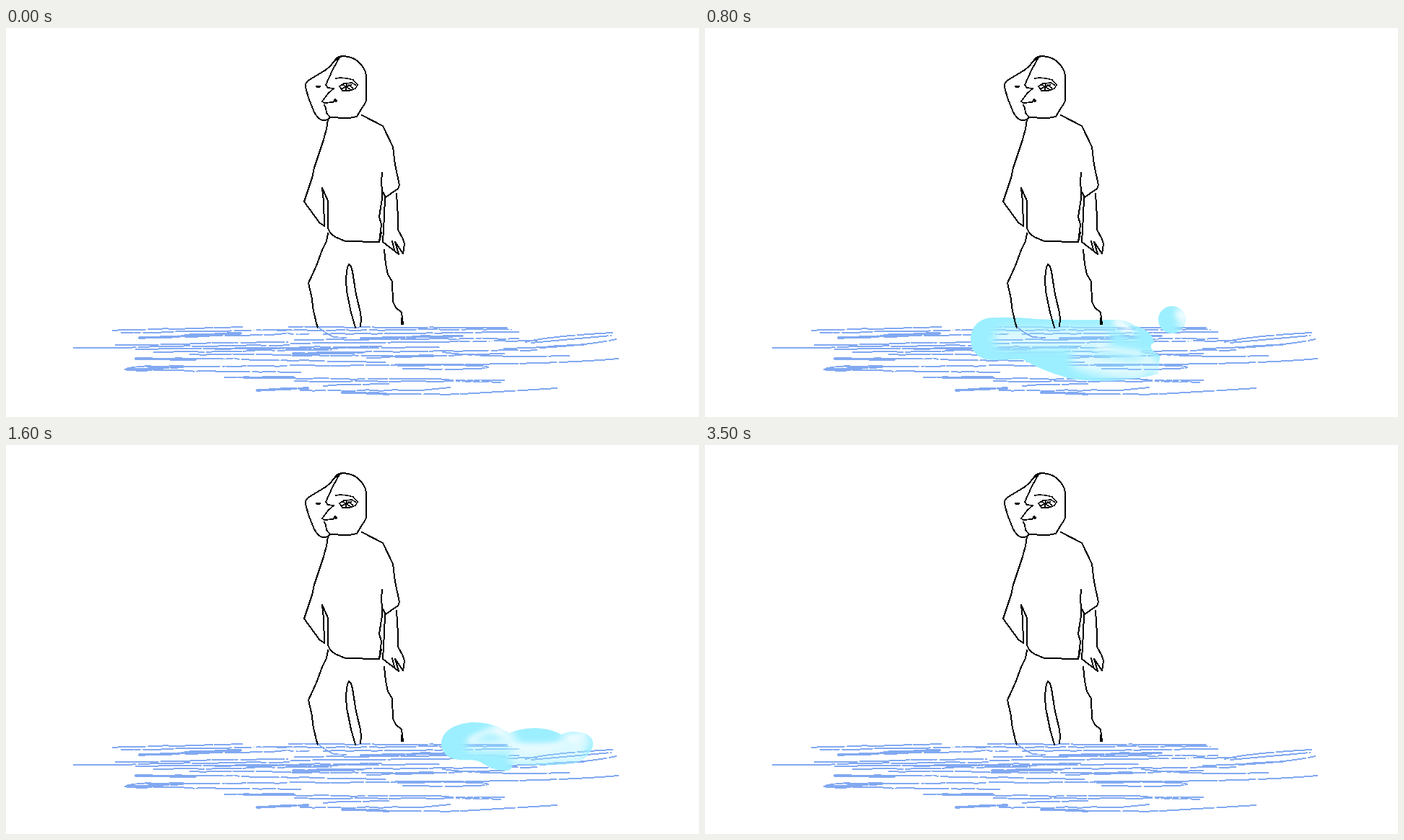
An HTML page that plays this animation: 960 px wide and 540 px high, repeating every 4500 ms.

```html
<!DOCTYPE html>
<html lang="en">
<head>
<meta charset="utf-8">
<title>Wading</title>
<style>
  html, body { margin: 0; width: 100%; height: 100%; overflow: hidden; background: #fff; }
  svg { display: block; width: 100vw; height: 100vh; }
  .ink, .water { fill: none; stroke-linecap: round; stroke-linejoin: round; shape-rendering: crispEdges; }
  .ink { stroke: #000; stroke-width: 2; }
  .water { stroke: #82a9f1; stroke-width: 2; }
</style>
</head>
<body>
<svg id="stage" viewBox="0 0 960 540"></svg>
<script>
const LOOP = 4500, WAVES_END = 2100;
const FOAM = '#9cefff';
const full = 'x="0" y="0" width="960" height="540"';

let seed = 11;
const rnd = () => (seed = (seed * 16807) % 2147483647) / 2147483647;

// Long thin water strokes: x1, y1, x2, y2
const thin = [
  [148, 420, 330, 415], [160, 423, 390, 419], [190, 430, 420, 424], [94, 444, 392, 440],
  [152, 440, 390, 436], [392, 415, 698, 416], [376, 420, 700, 418], [440, 425, 710, 422],
  [400, 433, 710, 431], [395, 438, 735, 434], [180, 446, 520, 442], [290, 446, 600, 443],
  [255, 453, 535, 455], [205, 450, 450, 447], [470, 450, 735, 447], [500, 458, 690, 452],
  [235, 458, 525, 464], [195, 470, 540, 468], [170, 475, 408, 478], [303, 485, 690, 489],
  [400, 490, 685, 491], [440, 497, 530, 493], [408, 503, 575, 503], [500, 508, 632, 508],
  [690, 445, 800, 440]
];

// Short heavy ones
const thick = [
  [185, 430, 325, 424], [492, 431, 632, 427], [398, 452, 494, 450], [540, 456, 592, 455],
  [180, 459, 262, 461], [168, 474, 245, 471], [330, 485, 398, 485], [348, 503, 418, 500],
  [466, 506, 530, 508]
];

// Bent ones
const bent = [
  'M605 450Q660 458 780 455', 'M540 467Q750 468 848 459', 'M543 469Q668 467 668 471Q660 475 550 473',
  'M200 469Q165 471 165 474', 'M632 508Q700 504 763 500', 'M575 503L615 499',
  'M720 436Q750 428 840 423', 'M740 444Q810 440 845 432', 'M728 437L838 427'
];

const water = (d, w = 2) => {
  const run = () => Math.round(25 + rnd() * 90);
  return `<path class="water" style="stroke-width:${w}" stroke-dasharray="${run()} 4 ${run()} 3 ${run()} 5" d="${d}"/>`;
};

// Slightly uneven line between two points
function rough([x1, y1, x2, y2]) {
  const n = Math.max(2, Math.round((x2 - x1) / 18));
  let d = `M${x1} ${y1}`;
  for (let k = 1; k <= n; k++) {
    const u = k / n;
    d += `L${(x1 + (x2 - x1) * u).toFixed(1)} ${(y1 + (y2 - y1) * u + rnd() * 1.6 - .8).toFixed(1)}`;
  }
  return d;
}

function speckles(x, y, w, h, n) {
  let s = '';
  while (n--) s += `<rect x="${Math.round(x + rnd() * w)}" y="${Math.round(y + rnd() * h)}" width="3" height="2" fill="#fff"/>`;
  return s;
}

const blur = (id, r) =>
  `<filter id="${id}" filterUnits="userSpaceOnUse" ${full}><feGaussianBlur stdDeviation="${r}"/></filter>`;
const brush = (color, w, o, d) =>
  `<path d="${d}" fill="none" stroke="${color}" stroke-width="${w}" stroke-opacity="${o}" stroke-linecap="round"/>`;

// A foam shape: outline, see-through strokes and white strokes
function foam(id, outline, wide, narrow, white) {
  return `<clipPath id="${id}-clip"><path d="${outline}"/></clipPath>
    <mask id="${id}-mask" maskUnits="userSpaceOnUse" ${full}>
      <rect ${full} fill="#fff"/>
      <g filter="url(#soft)">${brush('#000', 28, .66, wide)}${brush('#000', 15, .72, narrow)}</g>
    </mask>
    <g id="${id}"><g clip-path="url(#${id}-clip)">
      <rect ${full} fill="${FOAM}" mask="url(#${id}-mask)"/>
      <g filter="url(#mist)">${brush('#fff', 9, .6, white)}</g>
    </g></g>`;
}

const roll = foam('roll',
  'M332 391C308 392 295 406 296 424C297 443 307 453 324 453L420 456Q470 446 498 453Q514 462 530 462Q550 454 553 441Q553 425 540 420Q515 411 490 412Q472 404 462 394Q440 401 420 400Q370 391 332 391Z',
  'M345 420Q385 424 425 426M485 432L548 436',
  'M400 446L425 440M440 403L468 402M545 415L556 462',
  'M345 413Q390 407 426 415M408 448L422 444M450 405L468 412');

const sweep = foam('sweep',
  'M400 402C380 402 368 415 368 432C368 452 382 461 400 461L440 460Q470 477 500 485Q515 490 560 490Q600 488 628 480L630 455Q610 442 622 437Q620 420 595 413Q580 404 570 405Q500 406 460 404Q430 401 400 402ZM647 386A19 19 0 1 1 646.9 386Z',
  'M415 431L550 430M520 460Q560 474 600 474',
  'M572 409L590 425M612 458L632 480M661 392L664 414',
  'M571 407L586 418M545 444L600 451M656 398L666 400');

const surge = foam('surge',
  'M484 391C470 395 466 405 467 416C469 430 485 440 515 441Q540 462 570 473Q600 476 640 465Q680 466 710 470Q735 470 750 461Q751 445 758 432Q762 415 753 402Q735 390 715 391Q690 380 655 378Q620 380 598 392Q575 384 550 386Q535 390 525 398Q505 386 484 391Z',
  'M565 426Q640 433 720 420',
  'M505 414L540 426M580 462L655 453M680 388L750 402M753 425L746 462',
  'M650 382Q690 381 716 399M610 421Q650 404 730 413M600 456Q650 446 690 455');

const curl = foam('curl',
  'M645 385C620 387 604 398 603 414C604 430 615 439 640 437Q655 437 662 443Q675 452 695 452Q702 450 702 443Q740 446 780 443Q805 440 813 418Q815 402 795 399Q780 396 770 402Q750 392 730 393Q710 394 697 400Q675 384 645 385Z',
  'M710 431L790 430',
  'M645 417L688 418M776 407L802 411M680 392L700 408',
  'M645 409Q668 393 686 398M700 416Q735 424 770 415M782 407L800 402');

// Start time, foam shape, offset and scale about the shape's top left corner
const corner = { roll: [295, 390], sweep: [368, 386], surge: [467, 378], curl: [603, 384] };
const waves = [
  [200, 'roll', -36, -3, .89, 1.01],
  [400, 'roll'],
  [600, 'sweep', -46, 4, .94, .79],
  [800, 'sweep'],
  [1000, 'sweep', 54, -17, 1, 1.17],
  [1200, 'surge'],
  [1400, 'curl', -44, -7, 1.07, 1.13],
  [1600, 'curl']
];
const blinks = [[2600, 2800], [3300, 3500]];

function waveUse([, id, dx = 0, dy = 0, sx = 1, sy = 1]) {
  const [x, y] = corner[id];
  return `<use class="wave" href="#${id}" visibility="hidden" transform="translate(${x + dx} ${y + dy}) scale(${sx} ${sy}) translate(${-x} ${-y})"/>`;
}

const ink = (d, w = 2) => `<path class="ink" style="stroke-width:${w}" d="${d}"/>`;

const head =
  ink('M465 39L455 46Q446 57 440 60L420 72Q414 76 415 82L419 97L427 117Q433 127 438 128L443 128') +
  ink('M456 44Q460 39 467 39Q480 40 487 46Q497 54 499 66L499 101Q497 106 493 111L486 123Q478 125 470 125L450 124L445 127') +
  ink('M462 41L453 57L443 79L446 83L454 84L447 90L438 102L441 104L453 103L457 100M441 107L443 111L444 118L449 124', 1.8) +
  ink('M456 100L457 101', 4) + ink('M430 81L435 81', 3);

const torso =
  ink('M446 127L444 140L440 155L427 194L424 208L413 241L434 270L441 275L440 240L438 222L446 240L446 278Q449 286 456 290L470 296L517 297L520 284') +
  ink('M493 121L522 136L536 165L539 190L545 218L543 223L526 235L521 226L520 213L521 201') +
  ink('M521 226L521 237L517 262L520 273L517 297');

const arm = ink('M525 235L524 262L522 297L535 307L544 314L539 297L550 313L552 300L550 293L543 280L543 262L541 230M535 296L538 308');

const legs =
  ink('M446 285L444 296L438 308L430 330L419 354L424 376L425 388L430 410L432 416') +
  ink('M484 416L478 395L472 365L471 350Q472 332 475 328Q479 329 481 345L485 370L491 395L492 405L491 414') +
  ink('M524 308L526 328L529 342L535 352L536 380L540 388L548 395L550 411L548 411L548 403');

const eyeOpen =
  ink('M457 70L463 69L473 70L481 72L487 79L484 84L476 87L466 87L462 81L468 77L479 76L484 79', 1.6) +
  ink('M467 79L478 86M466 84L478 79M472 77L471 86M475 79L480 83', 1.6);
const eyeShut =
  ink('M457 69L463 69L472 71L480 72L486 78L484 81', 1.6) +
  ink('M463 79L471 76L484 78M468 80L482 81') + ink('M470 80L477 81', 5);
const foot = d => `<path class="water" style="stroke-width:1.7" d="${d}"/>`;

const stage = document.getElementById('stage');
stage.innerHTML = `
  <defs>${blur('soft', 6)}${blur('mist', 3)}${roll}${sweep}${surge}${curl}</defs>
  <rect ${full} fill="#fff"/>
  ${thin.map(p => water(rough(p))).join('')}
  ${thick.map(p => water(rough(p), 3.5)).join('')}
  ${bent.map(d => water(d)).join('')}
  ${speckles(340, 414, 80, 12, 14)}${speckles(610, 428, 75, 16, 16)}${speckles(270, 452, 70, 8, 8)}${speckles(610, 485, 60, 8, 9)}
  ${waves.map(waveUse).join('')}
  ${head}${torso}${arm}${legs}
  <g id="open">${eyeOpen}${foot('M433 416Q445 425 454 429L471 430')}</g>
  <g id="shut">${eyeShut}${foot('M433 416Q447 429 459 430Q474 430 482 423')}</g>`;

const waveNodes = [...stage.querySelectorAll('.wave')];
const openNode = document.getElementById('open');
const shutNode = document.getElementById('shut');
const show = (node, on) => node.setAttribute('visibility', on ? 'visible' : 'hidden');

function draw(now) {
  const t = now % LOOP;
  waves.forEach(([start], i) => {
    const end = i + 1 < waves.length ? waves[i + 1][0] : WAVES_END;
    show(waveNodes[i], t >= start && t < end);
  });
  const shut = blinks.some(([a, b]) => t >= a && t < b);
  show(openNode, !shut);
  show(shutNode, shut);
}

function tick(now) {
  draw(now);
  requestAnimationFrame(tick);
}
draw(0);
requestAnimationFrame(tick);
</script>
</body>
</html>
```
